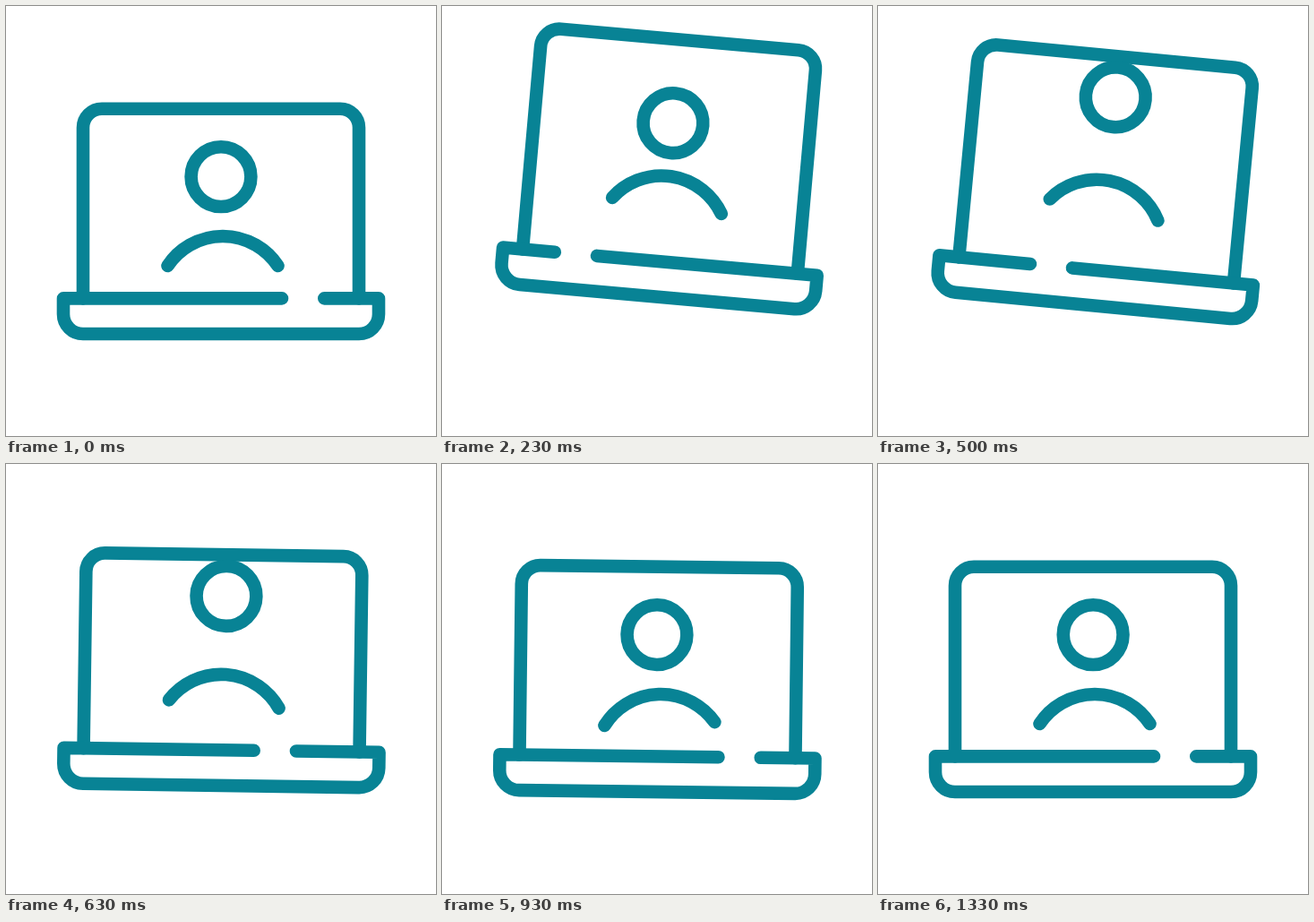
Write an HTML page that moves like this. It is 480x480 px and loops after 3370 ms.

```html
<!DOCTYPE html>
<html lang="en">
<head>
<meta charset="utf-8">
<title>Laptop call</title>
<style>
  html, body { margin: 0; width: 100%; height: 100%; overflow: hidden; background: #fff; }
  svg { display: block; width: 100%; height: 100%; }
</style>
</head>
<body>
<svg viewBox="0 0 480 480" fill="none" stroke="#088395" stroke-width="14.6"
     stroke-linecap="round" stroke-linejoin="round">
  <g id="laptop">
    <path id="screen"/>
    <path id="base"/>
    <circle id="head" cx="240" cy="190.6" r="33.4"/>
    <path id="body" d="M180.5 290A73.8 73.8 0 0 1 303.5 290"/>
  </g>
</svg>
<script>
const LOOP = 3370;
const PIVOT = "240 365";

// Keys are [step, value]; one step is a thirtieth of a second.
const BOUNCE = [[0, 0], [6.95, 1], [12, 1], [21.5, 0]];
const HEAD_LIFT = [[4, 0], [11.8, 58.5], [15, 58.5], [24.5, 0]];
const SWING = [[0, 0], [9, 5.8], [13.8, 5.8], [24, -3.9], [24.3, -3.9], [29.5, 1.85], [38, 0]];

const part = id => document.getElementById(id);
const laptop = part("laptop"), screenPath = part("screen"), base = part("base");
const head = part("head"), body = part("body");

const ease = u => u * u * (3 - 2 * u);

function at(keys, step) {
  if (step <= keys[0][0]) return keys[0][1];
  for (let i = 1; i < keys.length; i++) {
    const [t0, v0] = keys[i - 1], [t1, v1] = keys[i];
    if (step < t1) return v0 + (v1 - v0) * ease((step - t0) / (t1 - t0));
  }
  return keys[keys.length - 1][1];
}

function draw(ms) {
  const step = Math.min(40, Math.floor((10 * Math.floor(ms / 10) + 4) * 0.03));
  const bounce = at(BOUNCE, step);
  const top = 114.7 - 37 * bounce;
  const gap = 308 - 186 * bounce;

  laptop.setAttribute("transform",
    `translate(0 ${-41.4 * bounce}) rotate(${at(SWING, step)} ${PIVOT})`);
  screenPath.setAttribute("d",
    `M86 326.4V${top + 21}a21 21 0 0 1 21 -21H373a21 21 0 0 1 21 21V326.4`);
  base.setAttribute("d",
    `M${gap} 326.4H64V344a22 22 0 0 0 22 22H394a22 22 0 0 0 22 -22V326.4H${gap + 47.3}`);

  // The body trails the laptop, and the head trails the body.
  head.setAttribute("transform",
    `translate(${0.55 * at(SWING, step - 4)} ${-at(HEAD_LIFT, step)})`);
  body.setAttribute("transform",
    `translate(0 ${-32.5 * at(BOUNCE, step - 2)}) rotate(${at(SWING, step - 2)} 242 290)`);
}

let start;
function tick(now) {
  if (start === undefined) start = now;
  draw(Math.max(0, now - start) % LOOP);
  requestAnimationFrame(tick);
}
draw(0);
requestAnimationFrame(tick);
</script>
</body>
</html>
```
